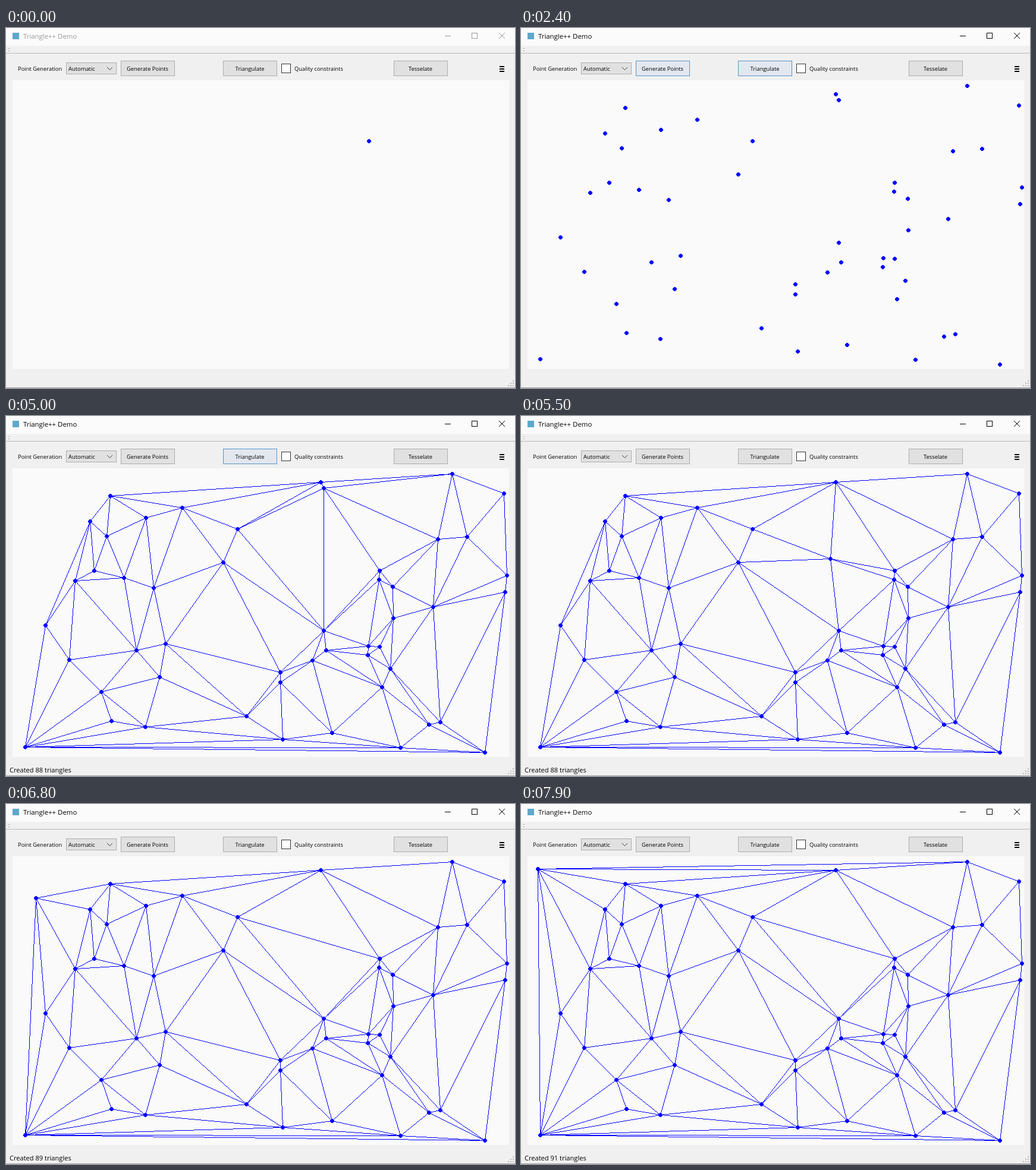
An HTML page with a canvas that plays this animation: 856x606 px, repeating every 8000 ms.

```html
<!DOCTYPE html>
<html lang="en">
<head>
<meta charset="utf-8">
<title>Triangle++ Demo</title>
<style>
  html, body { margin: 0; overflow: hidden; }
  canvas { display: block; }
</style>
</head>
<body>
<canvas id="stage" width="856" height="606"></canvas>
<script>
const ctx = document.getElementById('stage').getContext('2d', { alpha: false });
const LOOP = 8000, STEP = 100;
const BLUE = '#0000ff';

const fixedPoints = [
  [805,566], [32,557], [175,134], [141,177], [235,171], [169,202], [296,154], [389,190],
  [365,246], [148,260], [198,272], [116,277], [248,289], [66,352], [106,410], [219,394],
  [268,383], [160,464], [258,439], [177,513], [234,523], [404,505], [465,544], [461,431],
  [461,448], [515,411], [534,361], [538,394], [548,533], [529,111], [628,260], [627,275],
  [650,287], [651,340], [609,387], [628,388], [608,402], [646,425], [632,456], [663,558],
  [711,519], [730,515], [839,296], [842,268], [718,321], [726,207], [775,203], [750,97],
  [837,130]
];

// Dragged point: time, x, y
const dragPath = [
  [5000,534,121], [5300,526,180], [5500,520,240], [5800,415,262], [6000,301,264],
  [6300,190,243], [6600,91,181], [6800,50,158], [7200,36,130], [7600,29,112],
  [7700,28,110], [7900,28,109]
];

// Button looks: fill, border
const looks = {
  normal: ['#e1e1e1', '#adadad'],
  fading: ['#e3e8f0', '#5595c9'],
  hover: ['#e5f1fb', '#0078d7'],
  pressed: ['#cce4f7', '#005499']
};

function dragged(t) {
  const next = dragPath.findIndex(key => key[0] > t);
  if (next === 0) return dragPath[0].slice(1);
  if (next < 0) return dragPath[dragPath.length - 1].slice(1);
  const [t0, x0, y0] = dragPath[next - 1], [t1, x1, y1] = dragPath[next];
  const k = (t - t0) / (t1 - t0);
  return [Math.round(x0 + (x1 - x0) * k), Math.round(y0 + (y1 - y0) * k)];
}

// Delaunay triangulation grown from the bottom hull edge
function triangulate(points) {
  const done = new Set(), open = [[0, 1]], edges = [];
  let count = 0;
  const id = (a, b) => a * 100 + b;
  while (open.length) {
    const [a, b] = open.pop();
    if (done.has(id(a, b))) continue;
    done.add(id(a, b));
    const [ax, ay] = points[a], [bx, by] = points[b];
    let apex = -1, best = Infinity;
    points.forEach(([x, y], i) => {
      const cross = (bx - ax) * (y - ay) - (by - ay) * (x - ax);
      if (cross <= 0) return;
      const cot = ((ax - x) * (bx - x) + (ay - y) * (by - y)) / cross;
      if (cot < best) { best = cot; apex = i; }
    });
    if (apex < 0) continue;
    count++;
    done.add(id(b, apex)).add(id(apex, a));
    edges.push([a, b], [b, apex], [apex, a]);
    open.push([apex, b], [a, apex]);
  }
  return { edges, count };
}

function rect(x, y, w, h, fill) {
  ctx.fillStyle = fill;
  ctx.fillRect(x, y, w, h);
}

function frame(x, y, w, h, fill, border) {
  rect(x, y, w, h, border);
  rect(x + 1, y + 1, w - 2, h - 2, fill);
}

function text(str, x, y, size, align = 'left', color = '#000') {
  ctx.font = `${size}px "Open Sans", "Noto Sans", sans-serif`;
  ctx.textAlign = align;
  ctx.fillStyle = color;
  ctx.fillText(str, x, y);
}

function stroke(color, ...points) {
  ctx.strokeStyle = color;
  ctx.beginPath();
  points.forEach(([x, y]) => ctx.lineTo(x, y));
  ctx.stroke();
}

// One pixel wide line without smoothing
function pixelLine([x0, y0], [x1, y1]) {
  const n = Math.max(Math.abs(x1 - x0), Math.abs(y1 - y0));
  for (let i = 0; i <= n; i++) {
    rect(Math.round(x0 + (x1 - x0) * i / n), Math.round(y0 + (y1 - y0) * i / n), 1, 1, BLUE);
  }
}

function dot([x, y]) {
  rect(x - 3, y - 1, 7, 3, BLUE);
  rect(x - 2, y - 2, 5, 5, BLUE);
  rect(x - 1, y - 3, 3, 7, BLUE);
}

function button(label, x, look) {
  frame(x, 55, 91, 26, ...looks[look]);
  text(label, x + 45, 72, 9.4, 'center');
}

function drawWindow(t) {
  const ink = t < 1000 ? '#999999' : '#000000';
  rect(0, 0, 856, 606, '#f0f0f0');
  rect(0, 0, 856, 30, '#fbfbfb');
  rect(11, 8, 11, 11, '#5fa8c9');
  text('Triangle++ Demo', 29, 18, 11.4, 'left', ink);
  rect(738, 13, 10, 1, ink);
  frame(783, 8, 10, 10, '#fbfbfb', ink);
  stroke(ink, [829, 8], [839, 18]);
  stroke(ink, [839, 8], [829, 18]);

  rect(4, 34, 2, 1, '#a0a0a0');
  rect(4, 38, 2, 1, '#a0a0a0');
  rect(0, 42, 856, 1, '#b9b9b9');
  rect(0, 605, 856, 1, '#a0a0a0');
  for (let row = 0; row < 3; row++) {
    for (let col = 0; col <= row; col++) {
      rect(852 - 4 * col, 593 + 4 * row, 2, 2, '#b8b8b8');
    }
  }

  text('Point Generation', 20, 72, 9.4);
  frame(101, 58, 85, 20, ...looks.normal);
  text('Automatic', 105, 72, 9.4);
  stroke('#404040', [170, 66], [174.5, 70.5], [179, 66]);
  frame(463, 60, 16, 16, '#ffffff', '#333333');
  text('Quality constraints', 485, 72, 9.4);
  for (let i = 0; i < 3; i++) rect(830, 64 + 4 * i, 8, 2, '#000');

  button('Generate Points', 193,
    t < 1100 || t >= 2500 ? 'normal' : t < 1200 ? 'hover' :
    t < 1300 ? 'pressed' : t < 2400 ? 'hover' : 'fading');
  button('Triangulate', 365,
    t < 2400 || t >= 5100 ? 'normal' : t < 2500 ? 'fading' :
    t < 2600 ? 'hover' : t < 2700 ? 'pressed' : t < 5000 ? 'hover' : 'fading');
  button('Tesselate', 652, 'normal');
  rect(11, 88, 835, 486, '#fafafa');
}

function draw(t) {
  drawWindow(t);
  if (t < 1200) return dot([610, 190]);
  const points = [...fixedPoints, dragged(t)];
  if (t >= 2600) {
    const { edges, count } = triangulate(points);
    edges.forEach(([a, b]) => a < b ? pixelLine(points[a], points[b]) : pixelLine(points[b], points[a]));
    text(`Created ${count} triangles`, 6, 600, 11.1);
  }
  points.forEach(dot);
}

let shown = -1;
function tick() {
  const t = Math.floor(performance.now() % LOOP / STEP) * STEP;
  if (t !== shown) draw(shown = t);
  requestAnimationFrame(tick);
}
tick();
</script>
</body>
</html>
```
